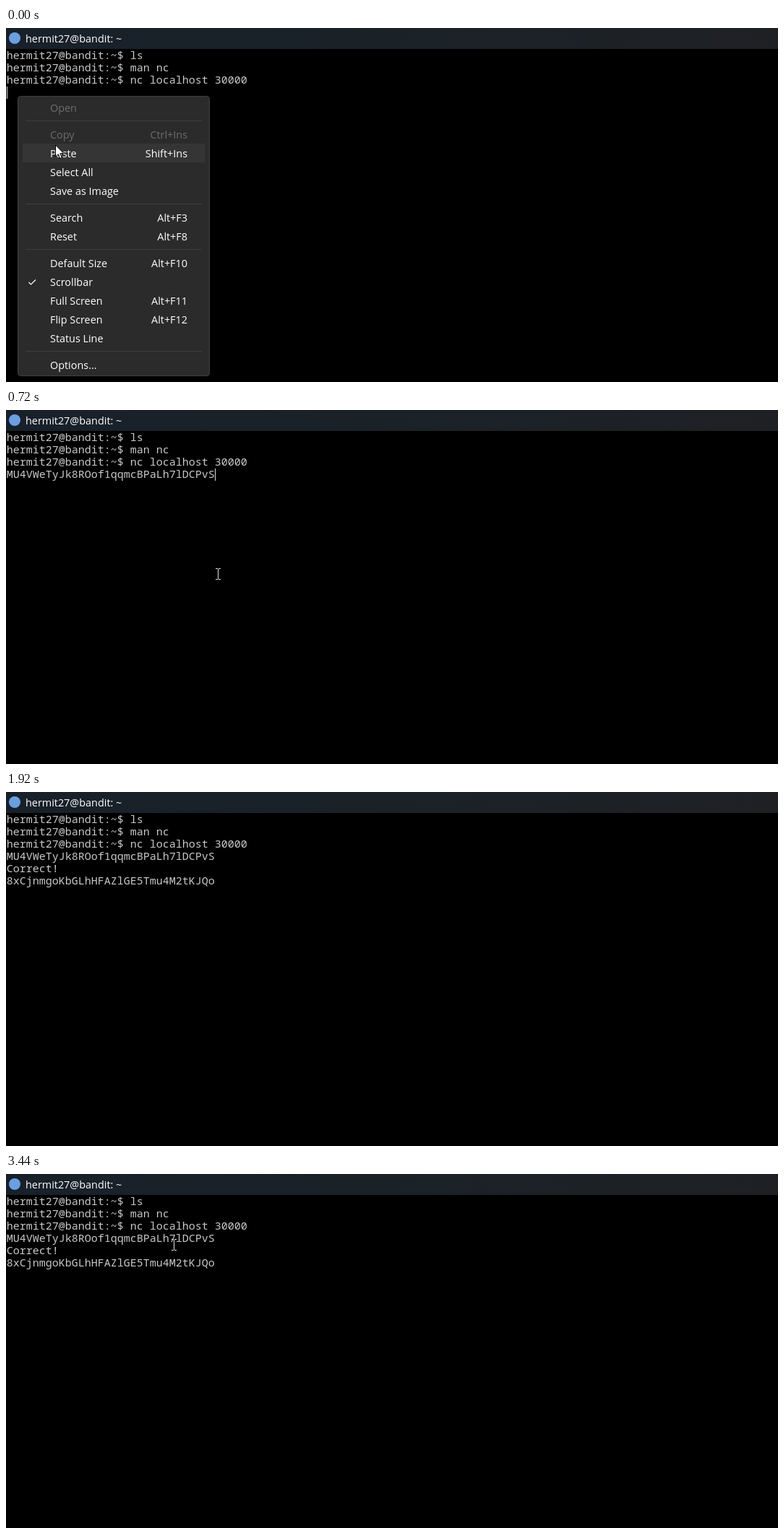
Animation, 1068 px wide and 490 px high, one loop 3.52 s. Source, as an HTML page with a canvas:

```html
<!DOCTYPE html>
<html lang="en">
<head>
<meta charset="utf-8">
<title>Terminal</title>
<style>
html, body { margin: 0; width: 100%; height: 100%; overflow: hidden; background: #000; }
canvas { display: block; }
</style>
</head>
<body>
<canvas id="stage" width="1068" height="490"></canvas>
<script>
const ctx = document.getElementById('stage').getContext('2d');
const LOOP = 3520, STEP = 80;
const MONO = '500 15px "Noto Sans Mono", monospace';
const UI = '14.4px "Open Sans", sans-serif';
const CELL = 9, LEFT = 1, ROW = 17;
const USER = 'hermit27';
const PROMPT = USER + '@bandit:~$ ';

// When each thing happens, in ms
const PICK = 480, PASTE = 640, ENTER = 1360;

const LINES = [
  [0, PROMPT + 'ls'],
  [0, PROMPT + 'man nc'],
  [0, PROMPT + 'nc localhost 30000'],
  [PASTE, 'MU4VWeTyJk8ROof1qqmcBPaLh7lDCPvS'],
  [ENTER, 'Correct!'],
  [ENTER, '8xCjnmgoKbGLhHFAZlGE5Tmu4M2tKJQo']
];

// label, middle of the row, shortcut, disabled
const ITEMS = [
  ['Open', 111, '', true],
  ['Copy', 148, 'Ctrl+Ins', true],
  ['Paste', 174, 'Shift+Ins'],
  ['Select All', 200],
  ['Save as Image', 226],
  ['Search', 263, 'Alt+F3'],
  ['Reset', 289, 'Alt+F8'],
  ['Default Size', 326, 'Alt+F10'],
  ['Scrollbar', 352],
  ['Full Screen', 378, 'Alt+F11'],
  ['Flip Screen', 404, 'Alt+F12'],
  ['Status Line', 430],
  ['Options...', 467]
];
const RULES = [128, 243, 306, 447];

// Pointer keys: time, x, y
const ARROW = [[0, 68, 162], [240, 71, 172], [400, 73, 179]];
const BEAM_OUT = [[480, 75, 180], [560, 78, 181], [800, 400, 250], [1040, 742, 288]];
const BEAM_BACK = [[2720, 772, 228], [2960, 885, 190], [3200, 520, 135], [3360, 296, 105], [3440, 232, 98]];

function rect(x, y, w, h, color) {
  ctx.fillStyle = color;
  ctx.fillRect(x, y, w, h);
}

function text(str, x, y, font, color, align = 'left') {
  ctx.font = font;
  ctx.fillStyle = color;
  ctx.textAlign = align;
  ctx.fillText(str, x, y);
}

function along(keys, t) {
  let i = 0;
  while (i < keys.length - 2 && t >= keys[i + 1][0]) i++;
  const [t0, x0, y0] = keys[i], [t1, x1, y1] = keys[i + 1];
  const k = Math.min(1, Math.max(0, (t - t0) / (t1 - t0)));
  return [Math.round(x0 + (x1 - x0) * k), Math.round(y0 + (y1 - y0) * k)];
}

function polyline(points, x, y) {
  ctx.beginPath();
  points.forEach(([px, py]) => ctx.lineTo(x + px, y + py));
}

function titleBar() {
  const g = ctx.createLinearGradient(0, 0, 1068, 0);
  g.addColorStop(0, '#18202a');
  g.addColorStop(0.5, '#1a2228');
  g.addColorStop(1, '#1f2024');
  rect(0, 0, 1068, 29, g);
  ctx.fillStyle = '#6b9fe0';
  ctx.beginPath();
  ctx.arc(12, 14, 8, 0, Math.PI * 2);
  ctx.fill();
  text(USER + '@bandit: ~', 27, 20, UI, '#fff');
}

function caret(t) {
  let on, col = 0, row = 3;
  if (t < PASTE) {
    on = t < 80 || t >= PICK;
  } else if (t < ENTER) {
    col = LINES[3][1].length;
    on = t - PASTE < 530;
  } else {
    row = 7;
    on = Math.floor((t - ENTER) / 530) % 2 === 0;
  }
  if (on) rect(LEFT + col * CELL, 30 + row * ROW, 1, ROW, '#e0e0e0');
}

function menuItem([label, mid, keys, off]) {
  const color = off ? '#6c6c6c' : '#fff';
  text(label, 61, mid + 5, UI, color);
  if (keys) text(keys, 251, mid + 5, UI, color, 'right');
}

function menu() {
  ctx.beginPath();
  ctx.roundRect(16.5, 94.5, 265, 387, 4);
  ctx.fillStyle = '#2b2b2b';
  ctx.fill();
  ctx.lineWidth = 1;
  ctx.strokeStyle = '#404040';
  ctx.stroke();
  RULES.forEach(y => rect(27, y, 244, 1, '#3e3e3e'));
  rect(23, 160, 252, 26, '#353535');
  ITEMS.forEach(menuItem);
  polyline([[0, 0], [3, 3], [9.5, -3.5]], 31.5, 352);
  ctx.strokeStyle = '#fff';
  ctx.lineWidth = 1.2;
  ctx.stroke();
}

function fadingItem(t) {
  const alpha = 0.68 - (t - PICK) / 260;
  if (alpha <= 0) return;
  ctx.globalAlpha = alpha;
  rect(19, 160, 260, 26, '#2b2b2b');
  rect(23, 160, 252, 26, '#363636');
  menuItem(ITEMS[2]);
  ctx.globalAlpha = 1;
}

function arrow([x, y]) {
  polyline([[0, 0], [0, 16], [3.7, 12.6], [6.3, 18.5], [8.8, 17.4], [6.3, 11.7], [11.3, 11.5]], x + 0.5, y);
  ctx.closePath();
  ctx.lineJoin = 'miter';
  ctx.lineWidth = 1;
  ctx.fillStyle = '#fff';
  ctx.fill();
  ctx.strokeStyle = '#000';
  ctx.stroke();
}

function beam([x, y]) {
  const c = '#e4e4e4';
  [-8, 7].forEach(dy => {
    rect(x - 3, y + dy, 3, 1, c);
    rect(x + 1, y + dy, 3, 1, c);
  });
  rect(x, y - 7, 1, 14, c);
}

function draw(t) {
  rect(0, 0, 1068, 490, '#000');
  titleBar();
  LINES.forEach(([from, str], i) => {
    if (t >= from) text(str, LEFT - 0.3, 43 + i * ROW, MONO, '#c8c8c8');
  });
  caret(t);
  if (t < PICK) {
    menu();
    arrow(along(ARROW, t));
    return;
  }
  fadingItem(t);
  if (t <= 1040) beam(along(BEAM_OUT, t));
  else if (t >= 2720) beam(along(BEAM_BACK, t));
}

const start = performance.now();
function tick() {
  const t = (performance.now() - start) % LOOP;
  draw(Math.floor(t / STEP) * STEP);
  requestAnimationFrame(tick);
}
tick();
</script>
</body>
</html>
```
